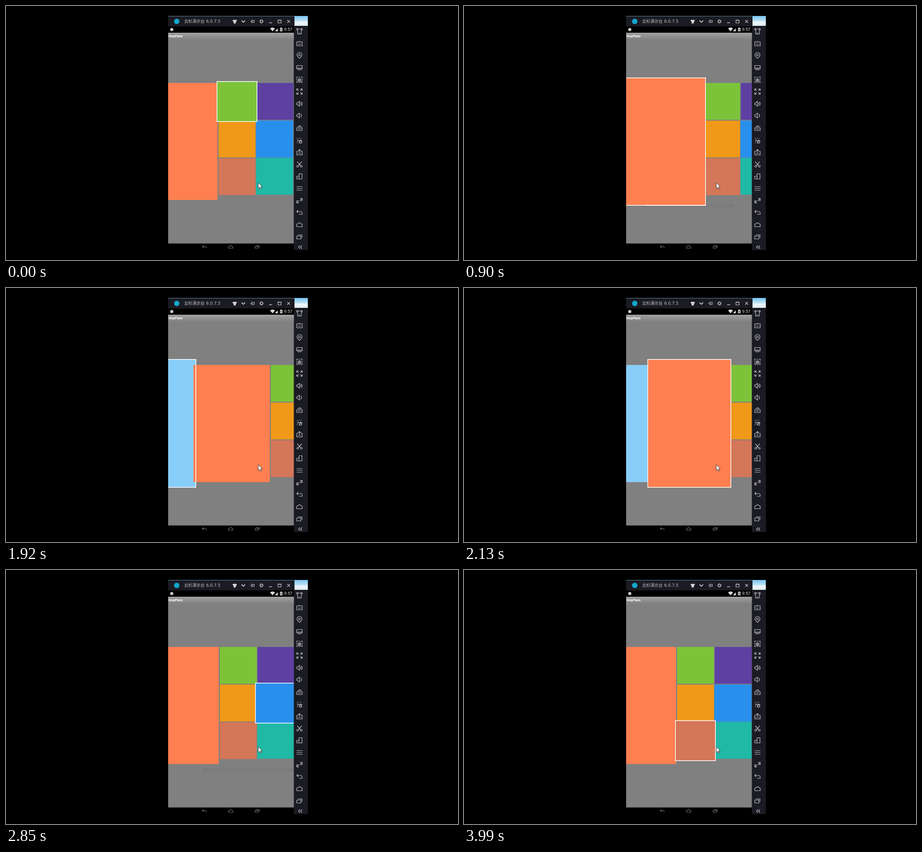
An HTML page with a canvas that plays this animation: 998x561 px, repeating every 4020 ms.

```html
<!DOCTYPE html>
<html>
<head>
<meta charset="utf-8">
<style>
html, body { margin: 0; width: 100%; height: 100%; overflow: hidden; background: #000; }
canvas, svg { position: absolute; left: 0; top: 0; }
.ico { fill: none; stroke: #c4c4c8; stroke-width: 1.2; }
.fill { fill: #d8d8dc; stroke: none; }
</style>
</head>
<body>
<canvas id="view" width="998" height="561"></canvas>
<svg id="chrome" width="998" height="561" viewBox="0 0 998 561">
  <defs>
    <linearGradient id="bar" x2="0" y2="1">
      <stop offset="0" stop-color="#a3a0a3"/><stop offset="1" stop-color="#808080"/>
    </linearGradient>
    <linearGradient id="sky" x2="0" y2="1">
      <stop offset="0" stop-color="#78c4f0"/><stop offset=".45" stop-color="#b8dff5"/>
      <stop offset=".65" stop-color="#f0f7fa"/><stop offset="1" stop-color="#d8e8ee"/>
    </linearGradient>
  </defs>
  <rect x="358" y="22" width="279" height="23" fill="#1b1b23"/>
  <rect x="358" y="22" width="279" height="1" fill="#5c8299"/>
  <rect x="635.5" y="45" width="31" height="494" fill="#1b1b23"/>
  <rect x="637" y="22" width="29.5" height="22" fill="url(#sky)"/>
  <rect x="358" y="45" width="277.5" height="14" fill="#000"/>
  <rect x="358" y="59" width="277.5" height="16" fill="url(#bar)"/>
  <rect x="358" y="524.5" width="277.5" height="14.5" fill="#000"/>

  <circle cx="377" cy="34" r="6" fill="#13a5cc"/>
  <text x="393.5" y="37.3" font-size="9" fill="#c8c8cc" font-family="'Noto Sans CJK SC','Noto Sans CJK',sans-serif">云杉演示台</text>
  <text x="442" y="37" font-size="9" fill="#c8c8cc" font-family="'DejaVu Sans',sans-serif">6.0.7.5</text>
  <circle cx="366" cy="52" r="3.5" fill="#c8c8c8"/>
  <text x="614" y="55.3" font-size="9.5" fill="#e0e0e0" font-family="Roboto,sans-serif">9:57</text>
  <text x="359" y="69.3" font-size="7.6" font-weight="700" fill="#fff" font-family="Roboto,sans-serif">HopPane</text>

  <g class="fill">
    <path d="M583 49.5Q588.5 45.5 594 49.5L588.5 56ZM594 56L600 49V56Z"/>
    <path d="M605 48.5H606.5V47.5H609V48.5H610.5V56H605Z"/>
    <path d="M503 30Q505 32 507 30L510 32L508.5 34.5L507.5 34V38.5H502.5V34L501.5 34.5L500 32Z"/>
  </g>
  <path d="M608.3 49.5L606.8 52.5H608.8L607.3 55" fill="none" stroke="#000" stroke-width=".8"/>
  <g class="ico">
    <path d="M520 32L524 36L528 32" stroke-width="1.8"/>
    <path d="M539 34H543M543 30V38M543 32H548V36H543M548 31V37"/>
    <circle cx="564" cy="34" r="2.6"/>
    <circle cx="564" cy="34" r="3.8" stroke-dasharray="1.5 1.485"/>
    <path d="M581 37H587.5" stroke-width="1.5"/>
    <path d="M600.5 31H607.5V37.5H600.5ZM600.5 31.7H607.5"/>
    <path d="M621 31L627 37M627 31L621 37"/>
  </g>
  <g class="ico" id="side"></g>
  <g class="ico" style="stroke:#707070">
    <path d="M436 529L433.5 531.5L436 534M433.5 531.5H440Q442 531.5 442 533.5V535"/>
    <path d="M491 535V532L496 529L501 532V535Z"/>
    <path d="M550 531H557V535H550ZM552 529.5H559V533.5"/>
  </g>
  <path d="M557 390V403.3L560.2 400.4L562.2 404.8L564.2 403.9L562.2 399.6H566Z" fill="#fff" stroke="#222" stroke-width=".9"/>
</svg>
<script>
// Sidebar icons: centre y, then a path around (0, 0)
const icons = [
  [56, "M-4 -5H4V6H-4ZM-6 -2V-6H-3M6 -2V-6H3M-2 4H2"],
  [83, "M-6 -4H6V5H-6ZM0 -4V-6M-3 -1H-2M-.5 -1H.5M2 -1H3M-3 2H3"],
  [109, "M0 6.5Q-5.5 2 -5.5 -1A5.5 5.5 0 0 1 5.5 -1Q5.5 2 0 6.5ZM-2 -1A2 2 0 1 1 2 -1A2 2 0 1 1 -2 -1"],
  [136, "M-6 -4.5H6V3H-6ZM-6 1H6M-4 5H4"],
  [163, "M-6 -3V-6H-3M-1.5 -6H1.5M3 -6H6V-3M6 -1.5V1.5M6 3V6H3M1.5 6H-1.5M-3 6H-6V3M-6 1.5V-1.5M-3 -1H3V4H-3ZM-2 -3H2M-3 1H3M0 -1V4"],
  [189, "M-6 -2V-6H-2M-6 -6L-2 -2M2 -6H6V-2M6 -6L2 -2M6 2V6H2M6 6L2 2M-2 6H-6V2M-6 6L-2 2"],
  [216, "M-6 -2H-4L0 -5.5V5.5L-4 2H-6ZM2 -2.5Q4 0 2 2.5M4 -4.5Q8 0 4 4.5"],
  [242, "M-6 -2H-4L0 -5.5V5.5L-4 2H-6ZM3 -4Q6 0 3 4"],
  [270, "M-6 -1H6V5H-6ZM-4.5 -3.5H5M-2 -5.5H3M-3 2H3"],
  [297, "M-6 -5H-4M-2 -5H0M2 -5H4M-6 5H-4M-2 5H0M-5 -2L-2 0L-5 2M0 0H5V4Q5 6 2.5 6Q0 6 0 4ZM0 2H5M2.5 -2V2"],
  [323, "M-3 -2H-6V6H6V-2H3M0 2V-6M-3 -3L0 -6L3 -3M-4 3H-2M-1 3H1M2 3H4"],
  [350, "M-5 -6L3 3M5 -6L-3 3M-6 4A2 2 0 1 1 -2 4A2 2 0 1 1 -6 4M2 4A2 2 0 1 1 6 4A2 2 0 1 1 2 4"],
  [376, "M-6 0H-1V6H-6ZM-1 6H5.5V-5.5H-1V0"],
  [403, "M-6.5 -4H6.5M-6.5 0H6.5M-6.5 4H6.5"],
  [430, "M1 -5H6V0H3M6 -5L1 0M-1 5H-6V0H-3M-6 5L-1 0"],
  [456, "M-3 -5L-6 -2L-3 1M-6 -2H3Q6 -2 6 2V4H-1"],
  [483, "M-6 4.5V-1L0 -4.5L6 -1V4.5Z"],
  [510, "M-6 -2H3V4.5H-6ZM-3.5 -4.5H5.5V2"],
  [532, "M1 -3L-2 .5L1 4M5.5 -3L2.5 .5L5.5 4"]
];
document.getElementById("side").innerHTML = icons.map(([y, d]) =>
  `<path transform="translate(648 ${y})" d="${d}"/>`).join("");

// Tiles: x is relative to the right edge of the coral tile
const tile = (x, y, w, h, color) => ({ x, y, w, h, color });
const tiles = {
  sky: tile(-339.5, 170, 168.5, 258.5, "#87cefa"),
  coral: tile(-168.5, 170, 168.5, 258.5, "#ff7f50"),
  green: tile(2.4, 170, 81.5, 81.2, "#7cc33a"),
  amber: tile(2.4, 253.2, 81.5, 81.2, "#f09818"),
  rose: tile(2.4, 336.4, 81.5, 81.2, "#d47658"),
  purple: tile(85.7, 170, 81.5, 81.2, "#5d40a2"),
  blue: tile(85, 253, 82, 82, "#2890ec"),
  teal: tile(85, 335.6, 82, 81, "#1fb9a6")
};

// Focus moves: start, tile, scroll position, duration, end of scrollbar
const moves = [
  [0, "green", 467, 1, 0],
  [150, "amber", 467, 240, 0],
  [420, "rose", 467, 240, 0],
  [690, "coral", 526, 260, 1140],
  [1320, "sky", 582.3, 260, 1680],
  [1920, "coral", 582.3, 240, 0],
  [2280, "amber", 551.5, 260, 2580],
  [2730, "blue", 468, 165, 3240],
  [3270, "teal", 468, 210, 0],
  [3570, "rose", 468, 240, 0]
];

const LOOP = 4020, STEP = 30, GROW = 0.095;
const ctx = document.getElementById("view").getContext("2d");
const mix = (a, b, p) => a + (b - a) * p;

function box(name, scroll, grow) {
  const { x, y, w, h } = tiles[name];
  return [scroll + x - w * grow / 2, y - h * grow / 2, w * (1 + grow), h * (1 + grow)];
}

function paint(name, scroll, grow) {
  ctx.fillStyle = tiles[name].color;
  ctx.fillRect(...box(name, scroll, grow));
}

function paintBar(scroll, alpha) {
  const x = 398 - (scroll - 525.5) * 0.7;
  ctx.globalAlpha = alpha;
  ctx.fillStyle = "#505050";
  ctx.fillRect(x, 440, 194.5, 3);
  ctx.fillStyle = "#c8c8c8";
  ctx.fillRect(x + 1, 441, 192.5, 1);
  ctx.globalAlpha = 1;
}

// White frame on whole pixels, just enclosing the given box
function paintFrame([x, y, w, h]) {
  const left = Math.floor(x), top = Math.floor(y);
  ctx.strokeStyle = "#fff";
  ctx.lineWidth = 1.5;
  ctx.strokeRect(left + 0.75, top + 0.75,
    Math.ceil(x + w) - left - 1.5, Math.ceil(y + h) - top - 1.5);
}

function draw(time) {
  const i = moves.findLastIndex(m => m[0] <= time);
  const [start, focus, goal, span, barEnd] = moves[i];
  const [, last, from] = moves[Math.max(0, i - 1)];
  const p = i ? 1 - (1 - Math.min(1, (time - start) / span)) ** 3 : 1;
  const scroll = mix(from, goal, p);

  ctx.save();
  ctx.beginPath();
  ctx.rect(358, 59, 277.5, 466);
  ctx.clip();
  ctx.fillStyle = "#808080";
  ctx.fillRect(358, 59, 278, 466);

  for (const name in tiles) paint(name, scroll, 0);
  if (last !== focus) paint(last, scroll, GROW * (1 - p));
  if (time < barEnd) paintBar(scroll, Math.min(1, (barEnd - time) / 120));
  paint(focus, scroll, GROW * p);

  // The frame flies from the last tile to the focused one
  const a = box(last, from, GROW), b = box(focus, scroll, GROW);
  paintFrame(a.map((v, k) => mix(v, b[k], p)));
  ctx.restore();
}

const origin = performance.now();
function tick() {
  const time = (performance.now() - origin) % LOOP;
  draw(Math.floor(time / STEP) * STEP);
  requestAnimationFrame(tick);
}
tick();
</script>
</body>
</html>
```
